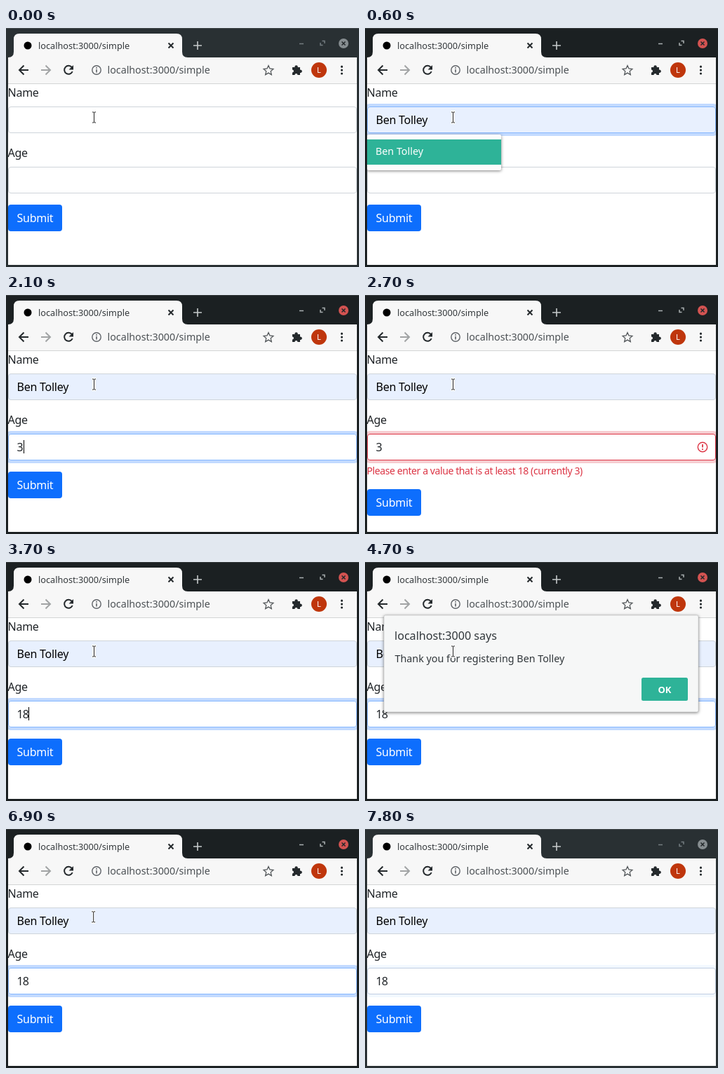
An HTML page for the animation above (7.9 s loop, 503 px wide and 341 px high).

```html
<!DOCTYPE html>
<html lang="en">
<head>
<meta charset="utf-8">
<title>Form validation</title>
<style>
  html, body { margin: 0; width: 100%; height: 100%; overflow: hidden; }
  svg { display: block; font-family: "Noto Sans", sans-serif; }
  .line { fill: none; stroke: #24292c; stroke-width: 2; }
  .form { font-size: 16px; letter-spacing: -.25px; fill: #212529; }
  .shadow { filter: drop-shadow(0 1px 2px rgba(0, 0, 0, .5)); }
</style>
</head>
<body>
<svg width="503" height="341" viewBox="0 0 503 341">
  <defs>
    <clipPath id="page"><rect x="3" y="80" width="497" height="258"/></clipPath>
  </defs>

  <!-- Window frame -->
  <rect id="frame" width="503" height="341"/>
  <rect width="503" height="1" fill="#fff" opacity=".14"/>
  <path d="M3 42Q11 42 11 34V16Q11 8 19 8H243Q251 8 251 16V34Q251 42 259 42H500V80H3Z" fill="#f7f7f7"/>
  <circle cx="31" cy="25" r="5.5"/>
  <text x="46" y="30" font-size="12.7" fill="#33383b">localhost:3000/simple</text>
  <path class="line" d="M231.500 21.500l7 7m0-7l-7 7" stroke-width="1.600"/>
  <path d="M267 25h12M273 19v12" stroke="#c6cacb" stroke-width="1.600"/>
  <g id="buttons" fill="none" stroke-width="1.500">
    <path d="M418 22.500h6M450.500 18.500h3.500v3.500M451.500 24.500h-3.500v-3.500"/>
  </g>
  <circle id="close" cx="481" cy="22" r="7"/>
  <path d="M478.500 19.500l5 5m0-5l-5 5" stroke="#23282b" stroke-width="1.500"/>

  <!-- Toolbar -->
  <path class="line" d="M32 60H19.500M25.500 53.500L19 60l6.500 6.500"/>
  <path class="line" d="M50 60H62.500M56.500 53.500L63 60l-6.500 6.500" style="stroke:#a2a4a5"/>
  <path class="line" d="M93.800 56A6 6 0 1 0 94.700 62"/>
  <path d="M96 53v6.500h-6.500z" fill="#24292c"/>
  <circle class="line" cx="129" cy="60" r="6.200" style="stroke:#5f6368;stroke-width:1.400"/>
  <path d="M129 59v4.500M129 56v1.700" stroke="#5f6368" stroke-width="1.600"/>
  <text x="144.500" y="65" font-size="14.250" fill="#4c5155">localhost:3000/simple</text>
  <path d="M374 53.500l2 4.500 4.900.5-3.700 3.300 1.100 4.800-4.300-2.500-4.300 2.500 1.100-4.800-3.700-3.300 4.900-.5z"
        fill="none" stroke="#55595c" stroke-width="1.300"/>
  <path d="M408 56h3.500a2.200 2.200 0 1 1 4.200 0H419v3.700a2.200 2.200 0 1 1 0 4.200V67h-3.500a2 2 0 0 0-4 0H408v-3.500a2 2 0 0 0 0-4z" fill="#24292c"/>
  <circle cx="446" cy="60" r="11" fill="#bf360c"/>
  <text x="446" y="64" font-size="11" fill="#fff" text-anchor="middle">L</text>
  <path d="M478.500 55.200h0m0 4.900h0m0 4.900h0" stroke="#24292c" stroke-width="3.200" stroke-linecap="round"/>
  <rect x="3" y="79" width="497" height="1" fill="#d3d4d5"/>
  <rect x="3" y="80" width="497" height="258" fill="#fff"/>

  <!-- Form -->
  <g class="form" clip-path="url(#page)">
    <text x="2.500" y="98">Name</text>
    <text x="2.500" y="184">Age</text>
    <rect id="nameGlow" x="1" y="110" width="501" height="42" rx="6" fill="none" stroke-width="4"/>
    <rect id="nameBox" x="3.500" y="112.500" width="496" height="37" rx="3.500"/>
    <text id="nameText" x="15.500" y="137" fill="#000"></text>
    <rect id="ageGlow" x="1" y="196" width="501" height="42" rx="6" fill="none" stroke-width="4"/>
    <rect id="ageBox" x="3.500" y="198.500" width="496" height="37" rx="3.500" fill="#fff"/>
    <text id="ageText" x="15.500" y="223"></text>
    <g id="error">
      <circle cx="481" cy="217" r="6.700" fill="none" stroke="#dc3545" stroke-width="1.400"/>
      <path d="M481 213v4.500m0 1.700v1.800" stroke="#dc3545" stroke-width="1.800"/>
      <text id="message" x="2.500" y="256" fill="#dc3545" style="font-size:14px;letter-spacing:-.41px"></text>
    </g>
    <g id="submit">
      <rect x="3" y="252" width="77" height="38" rx="4" fill="#0d6efd"/>
      <text x="15.500" y="277" fill="#fff">Submit</text>
    </g>
    <rect id="caret" width="1" height="19" fill="#000"/>
    <g id="menu" font-size="14.300" letter-spacing="0">
      <rect class="shadow" x="3" y="152" width="191" height="51" rx="2" fill="#fcfcfc"/>
      <rect id="option" x="3" y="159" width="191" height="36" fill="#2eb398"/>
      <text id="optionText" x="15" y="181"></text>
    </g>
  </g>

  <!-- Alert -->
  <g id="alert">
    <rect class="shadow" x="27" y="76" width="448" height="138" rx="2" fill="#f6f7f7" stroke="#b4b6b7" stroke-width=".5"/>
    <text x="42" y="111" font-size="16.100" fill="#30363a">localhost:3000 says</text>
    <text id="thanks" x="42.500" y="143" font-size="14.300" fill="#30363a"></text>
    <rect id="ok" x="394" y="165" width="66" height="33" rx="2.500" fill="#2eb398"/>
    <text x="427" y="187" font-size="13" font-weight="600" fill="#fff" text-anchor="middle">OK</text>
  </g>

  <!-- Mouse pointer -->
  <g id="pointer">
    <g id="beam" fill="none">
      <path d="M-3 -8h6M-3 8h6M0 -8V8" stroke="#fff" stroke-width="3"/>
      <path d="M-2.500 -7.500h2l.5.500.5-.5h2M-2.500 7.500h2l.5-.5.5.500h2M0 -7V7" stroke="#222"/>
    </g>
    <path id="arrow" d="M-8 -8v14l3.300-3 2.200 5 2.200-1-2.200-4.800h4.500z" fill="#111" stroke="#fff"/>
  </g>
</svg>

<script>
const LOOP = 7900, STEP = 100;
const USER = "Ben Tolley";
const el = Object.fromEntries([...document.querySelectorAll("[id]")].map(e => [e.id, e]));

const ramp = (t, from, to) => Math.min(1, Math.max(0, (t - from) / (to - from)));
const mix = (a, b, k) => `color-mix(in srgb, ${b} ${100 * k}%, ${a})`;
const latest = (t, steps) => steps.filter(s => s[0] <= t).pop()[1];
const show = (e, on) => { e.style.opacity = +on; };
const move = (e, x, y) => e.setAttribute("transform", `translate(${x} ${y})`);

// Visible spans of the text caret: start, end, x, y
const carets = [
  [200, 600, 16, 122], [1200, 1700, 16, 122],
  [1700, 2100, 16, 207], [2100, 2700, 25, 207],
  [3200, 3300, 16, 207], [3300, 3500, 24, 207], [3500, 4200, 32, 207],
  [6200, 6600, 32, 207], [7100, 7500, 32, 207]
];

function drawWindow(t) {
  const active = ramp(t, 100, 400) - ramp(t, 7700, 7800);
  el.frame.style.fill = mix("#293033", "#1b2022", active);
  el.buttons.style.stroke = mix("#737c80", "#a9aeb0", active);
  el.close.style.fill = mix("#868d90", "#d35351", active);
}

function drawField(glow, box, focus, invalid) {
  glow.style.stroke = mix("#0d6efd", "#dc3545", invalid);
  glow.style.opacity = .25 * focus;
  box.style.stroke = mix("#ced4da", mix("#86b7fe", "#dc3545", invalid), focus);
}

function drawForm(t) {
  const invalid = ramp(t, 2200, 2400) - ramp(t, 3400, 3700);
  const failed = t >= 2300 && t < 3500;
  const age = latest(t, [[0, ""], [2100, "3"], [3200, ""], [3300, "1"], [3500, "18"]]);
  drawField(el.nameGlow, el.nameBox, ramp(t, 100, 300) - ramp(t, 1700, 1900), 0);
  drawField(el.ageGlow, el.ageBox, ramp(t, 1700, 1900) - .8 * ramp(t, 7700, 7800), invalid);

  el.nameBox.style.fill = t < 600 ? "#fff" : "#e8f0fe";
  el.nameText.textContent = t < 600 ? "" : USER;
  el.ageText.textContent = age;
  el.ageText.style.letterSpacing = age === "18" ? "-.9px" : "";
  el.message.textContent = "Please enter a value" + (age && ` that is at least 18 (currently ${age})`);
  show(el.error, failed);
  move(el.submit, 0, failed ? 25 : 0);

  const caret = carets.find(([from, to]) => t >= from && t < to);
  show(el.caret, caret);
  el.caret.style.display = caret ? "" : "none";
  if (caret) move(el.caret, caret[2], caret[3]);

  const chosen = t >= 600;
  el.menu.style.opacity = ramp(t, 100, 400) * (1 - latest(t, [[0, 0], [1700, .16], [1800, .8], [1900, 1]]));
  show(el.option, chosen);
  el.optionText.style.fill = chosen ? "#fff" : "#30363a";
}

function drawAlert(t) {
  const closing = ramp(t, 6100, 6400);
  el.alert.style.opacity = ramp(t, 4500, 4700) * latest(t, [[0, 1], [6200, .96], [6300, .4], [6400, 0]]);
  move(el.alert, 0, -6 * (1 - ramp(t, 4500, 4700)) - 12 * closing);
  el.ok.setAttribute("transform", closing ? "translate(427 182) scale(.97 .95) translate(-427 -181.500)" : "");
}

function drawPointer(t) {
  const k = ramp(t, 6800, 7400);
  const y = 127.5 - 76 * k * k;
  const overText = y > 112 || y < 72;
  move(el.pointer, 125.5 - 5 * k, y);
  show(el.pointer, t < 7500);
  show(el.beam, overText);
  show(el.arrow, !overText);
}

function draw(now) {
  const t = Math.floor(now % LOOP / STEP) * STEP;
  drawWindow(t);
  drawForm(t);
  drawAlert(t);
  drawPointer(t);
  requestAnimationFrame(draw);
}

el.optionText.textContent = USER;
el.thanks.textContent = `Thank you for registering ${USER}`;
const start = performance.now();
requestAnimationFrame(now => draw(Math.max(0, now - start)));
</script>
</body>
</html>
```
